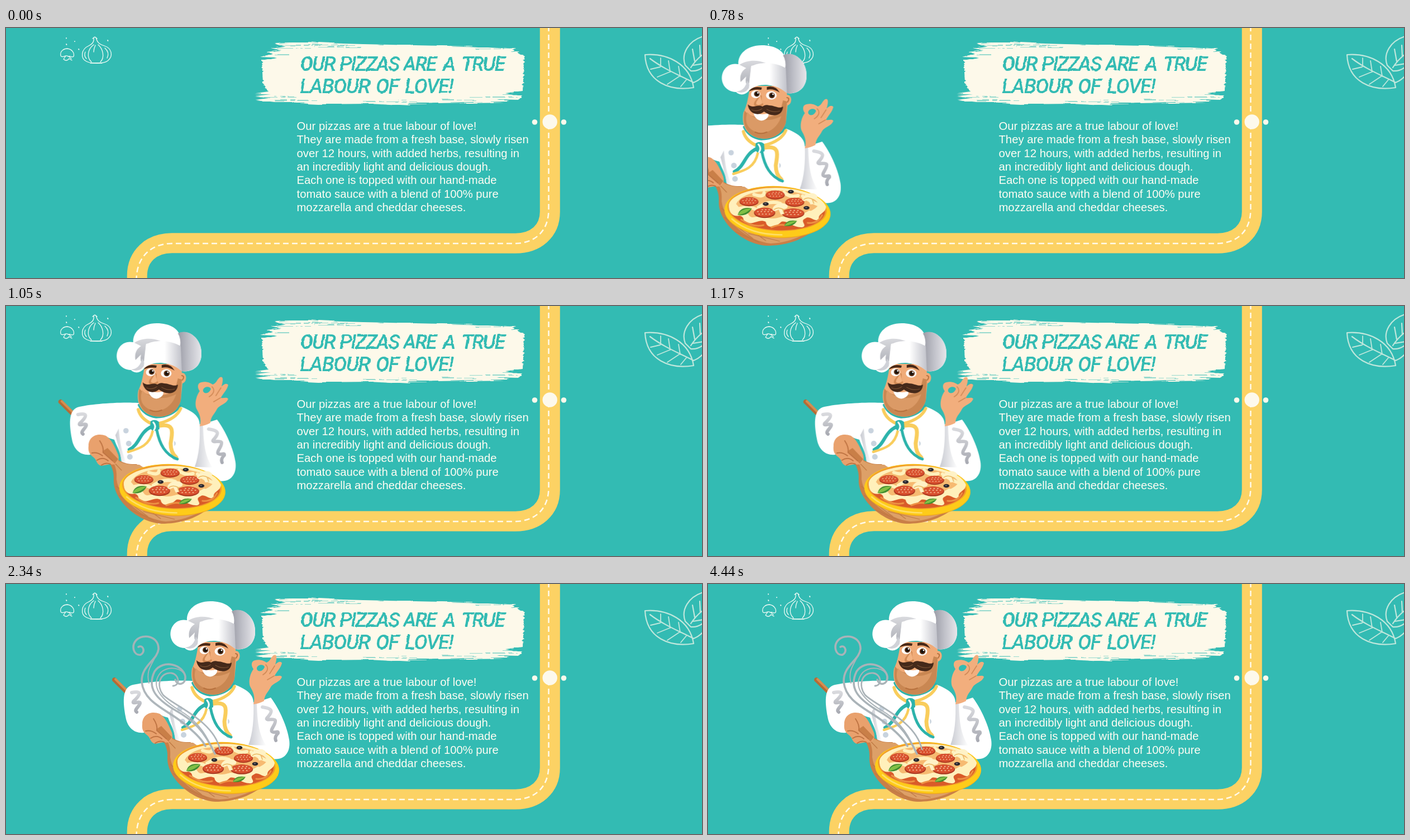
Animation, 1246 px wide and 449 px high, one loop 4.51 s. Source, as an HTML page without scripts:

```html
<!DOCTYPE html>
<html lang="en">
<head>
<meta charset="utf-8">
<title>Pizza chef</title>
<style>
html, body { margin: 0; width: 100%; height: 100%; overflow: hidden; background: #33bbb3; }
svg { display: block; width: 1246px; height: 449px; }
.line { fill: none; stroke-linecap: round; stroke-linejoin: round; }
.copy { font: 20.25px "Liberation Sans", Arial, sans-serif; fill: #fffdf3; }
.title { font: italic 500 36px Roboto, sans-serif; letter-spacing: -2.1px; fill: #33bbb3; }
.chef { animation: slide 4510ms infinite; }
.steam { animation: steam 4510ms infinite; }
@keyframes slide {
  0%, 8.625% { transform: translateX(-520px); animation-timing-function: steps(27); }
  26.585%, 100% { transform: none; }
}
@keyframes steam {
  0%, 26.585% { opacity: 0; animation-timing-function: steps(40); }
  53.19% { opacity: 1; animation-timing-function: steps(40); }
  79.8% { opacity: 0; animation-timing-function: steps(28); }
  98.43%, 100% { opacity: 1; }
}
</style>
</head>
<body>
<svg viewBox="0 0 1246 449">
<defs>
  <filter id="dry" x="-5%" y="-10%" width="110%" height="120%">
    <feTurbulence type="fractalNoise" baseFrequency=".015 .3" numOctaves="2" seed="4"/>
    <feDisplacementMap in="SourceGraphic" scale="7" xChannelSelector="R" yChannelSelector="G"/>
  </filter>
  <filter id="rough" x="-5%" y="-10%" width="110%" height="120%">
    <feTurbulence type="fractalNoise" baseFrequency=".08 .14" numOctaves="2" seed="9"/>
    <feDisplacementMap in="SourceGraphic" scale="3" xChannelSelector="R" yChannelSelector="G"/>
  </filter>
  <linearGradient id="puff">
    <stop offset="0" stop-color="#9b9ca6"/><stop offset=".45" stop-color="#bfc0c8"/><stop offset="1" stop-color="#e6e6ea"/>
  </linearGradient>
  <linearGradient id="band">
    <stop offset="0" stop-color="#fff"/><stop offset=".55" stop-color="#fff"/><stop offset="1" stop-color="#c2c3cb"/>
  </linearGradient>
  <linearGradient id="fold" x1="0" y1="0" x2="0" y2="1">
    <stop offset="0" stop-color="#d9dade"/><stop offset="1" stop-color="#a9abb3"/>
  </linearGradient>
  <linearGradient id="side">
    <stop offset="0" stop-color="#c9cbd2"/><stop offset="1" stop-color="#fff"/>
  </linearGradient>
  <g id="salami">
    <ellipse rx="17" ry="8.3" fill="#a9361f"/>
    <ellipse cy="-.8" rx="16" ry="7.2" fill="#d9512f"/>
    <path class="line" d="M-11-2H12M-9 2H11M-4-5H8" stroke="#f8c9a0" stroke-width="1.7" stroke-dasharray=".5 5"/>
  </g>
  <g id="olive"><ellipse rx="5.3" ry="3.3" fill="#25242c"/><ellipse cx="-.6" cy="-.6" rx="2" ry="1" fill="#77737c"/></g>
  <g id="basil">
    <path d="M-13 6C-11-5 0-9 12-6C8 3 0 8-13 6Z" fill="#3f8c2f"/>
    <path d="M-13 6C-9-3 0-6 12-6C5-1 0 4-13 6Z" fill="#80bf45"/>
  </g>
  <g id="shroom">
    <path d="M-13 2C-12-8 6-14 14-5C16 1 8 1 5 1L8 10L2 11L-2 2C-5 4-11 7-13 2Z" fill="#fff2c6"/>
    <path class="line" d="M-10 2Q-4-3 5 1L8 9" stroke="#eab964" stroke-width="1.6"/>
  </g>
</defs>
<rect width="1246" height="449" fill="#33bbb3"/>

<!-- road -->
<path d="M973.8-20V330C973.8 365 948 386.7 912 386.7L297 386.2C260 386.2 234.7 410 234.7 445V470" fill="none" stroke="#fcd264" stroke-width="36"/>
<path d="M971.5-4V326C971.5 365 947 387 910 387H297C260 387 233.5 411 233.5 452" fill="none" stroke="#fffaea" stroke-width="2.5" stroke-dasharray="10 6"/>
<g fill="#fdf9ec"><circle cx="973.7" cy="168.5" r="13.2"/><circle cx="946.5" cy="169" r="4.8"/><circle cx="998.5" cy="169" r="4.8"/></g>

<!-- banner -->
<g filter="url(#dry)">
  <path d="M458 58L484 53L455 52L478 46L466 43L492 40L474 36L500 33L480 27L540 25L605 28L640 29L830 33L912 38L905 42L921 40L915 45L928 50L925 113L895 117L924 121L918 129L880 128L900 133L830 134L720 136L725 140L650 136L560 137L480 133L447 129L470 126L447 123L474 120L447 117L470 114L460 100Z" fill="#fdf9ea"/>
  <g fill="none" stroke="#33bbb3" stroke-width="1.2">
    <path d="M486 36H545M500 31H610M560 34H640M480 48H506M840 38H905M885 43H912" stroke-dasharray="28 5 12 3"/>
    <path d="M462 125H520M480 130H560M640 132H735M780 129H850M830 124H915M890 119H920" stroke-dasharray="22 6 9 4"/>
  </g>
</g>
<g class="title" filter="url(#rough)">
  <text y="76.5"><tspan x="526">OUR </tspan><tspan x="597">PIZZAS </tspan><tspan x="711">ARE </tspan><tspan x="782">A </tspan><tspan x="815">TRUE</tspan></text>
  <text y="116.5" letter-spacing="-1.4"><tspan x="526">LABOUR </tspan><tspan x="662">OF </tspan><tspan x="714">LOVE!</tspan></text>
</g>
<g class="copy">
  <text x="520.5" y="183">Our pizzas are a true labour of love!</text>
  <text x="520.5" y="207.3">They are made from a fresh base, slowly risen</text>
  <text x="520.5" y="231.6">over 12 hours, with added herbs, resulting in</text>
  <text x="520.5" y="255.9">an incredibly light and delicious dough.</text>
  <text x="520.5" y="280.2">Each one is topped with our hand-made</text>
  <text x="520.5" y="304.5">tomato sauce with a blend of 100% pure</text>
  <text x="520.5" y="328.8">mozzarella and cheddar cheeses.</text>
</g>

<!-- garlic and mushroom -->
<g class="line" stroke="#effaf5" stroke-width="1.3">
  <path d="M157 17C158 26 154 29 148 32C134 38 133 55 144 60C152 64 174 65 182 59C193 50 189 36 176 32C166 29 163 25 161 17M155 19L159 16L163 19"/>
  <path d="M157 30C146 38 144 53 153 61M165 30C174 38 177 53 169 61M160 31Q157 37 157 43M177 36Q186 44 181 54M142 43Q139 50 144 55M151 63L172 63"/>
  <path d="M98 50C96 41 104 37 110 37C118 38 123 45 121 51C118 54 115 49 111 51C107 47 101 55 98 50ZM107 50L103 56Q108 61 113 55L118 58M112 51L117 55"/>
  <path d="M108 29L108.5 30M108 18V18.5M130 38L130.5 38.5M182 22L182.5 23M123 24V24.2" stroke-width="1.8"/>
</g>

<!-- leaves -->
<g class="line" stroke="#bfe7dc" stroke-width="2.2">
  <path d="M1144 48C1184 45 1224 64 1231 107C1188 114 1146 97 1144 48ZM1153 55C1178 74 1206 85 1231 98Q1241 94 1248 86"/>
  <path d="M1172 69V54M1189 79L1186 59M1207 87L1204 69M1171 70L1154 74M1188 79L1166 88M1205 87L1184 101M1218 93L1208 105" stroke-width="1.8"/>
  <path d="M1248 15C1222 23 1208 46 1216 67L1226 77M1226 71Q1235 57 1248 47M1233 60L1229 38M1243 51L1242 31M1230 67L1248 64M1226 77Q1239 78 1248 70"/>
</g>

<g class="chef">
  <!-- handle end -->
  <path class="line" d="M194 172L222 200" stroke="#b56b35" stroke-width="8"/>
  <path class="line" d="M196 171L222 197" stroke="#d68d50" stroke-width="4"/>

  <!-- jacket -->
  <path d="M332 174C300 172 245 176 224 182C207 189 210 215 214 238C217 258 230 269 247 267L262 232L290 240L304 275L310 305H430L476 314C500 318 510 300 507 280C504 258 490 225 474 204L443 214C443 197 430 189 408 180Z" fill="#fff"/>
  <path d="M298 220C300 240 302 260 312 282H303C300 262 296 246 292 232Z" fill="url(#side)"/>
  <path d="M434 289C442 268 444 242 443 212L449 215C450 245 452 270 466 290Z" fill="url(#side)"/>
  <path d="M268 234C288 234 301 254 303 282L294 270C290 250 281 240 268 234Z" fill="#33bbb3"/>
  <g class="line" stroke="url(#fold)" stroke-width="6">
    <path d="M225 195C244 191 241 199 228 211C225 217 240 209 240 214C239 220 228 226 234 230"/>
    <path d="M459 221C480 224 477 230 467 241C464 246 480 241 482 245C484 251 473 261 476 265C480 269 488 262 487 268Q480 275 483 281"/>
  </g>
  <g fill="#c8d3de"><circle cx="311" cy="224" r="4.8"/><circle cx="316" cy="247" r="5"/><circle cx="318" cy="271" r="5"/><circle cx="389" cy="222" r="5"/><circle cx="395" cy="247" r="5"/><circle cx="399" cy="272" r="5"/></g>

  <!-- scarf -->
  <path d="M335 174L331 191L356 214L370 214L408 193V180L365 202Z" fill="#fff"/>
  <path d="M357 218C341 228 338 249 314 262C336 260 352 250 359 222ZM366 218C376 250 382 270 403 275C392 258 404 222 386 215Z" fill="#fff"/>
  <g class="line" stroke-width="5.5">
    <path d="M335 178Q344 196 365 199Q393 198 407 180" stroke="#2cb3ab"/>
    <path d="M333 186Q337 202 356 211M409 184Q401 203 370 211" stroke="#f9cd5c"/>
    <path d="M356 217C334 228 336 248 317 258" stroke="#2cb3ab" stroke-width="6"/>
    <path d="M359 224C354 250 336 256 315 262" stroke="#f9cd5c" stroke-width="4.5"/>
    <path d="M371 215C401 210 393 230 391 247Q391 263 401 272" stroke="#f9cd5c" stroke-width="7"/>
    <path d="M366 222C371 248 381 267 403 275" stroke="#2cb3ab" stroke-width="5"/>
  </g>
  <path d="M355 207Q363 202 370 208L371 221Q362 228 354 220Z" fill="#2cb3ab"/>
  <path class="line" d="M360 209Q366 216 361 223" stroke="#fff" stroke-width="3"/>

  <!-- raised hand -->
  <path fill-rule="evenodd" d="M443 216C447 202 442 193 437 184C433 172 439 158 443 153C438 146 439 138 446 137C455 135 462 138 466 141C472 140 474 132 479 128C486 125 485 134 482 145C486 140 492 138 494 142C492 151 484 158 481 165C486 166 492 163 494 167C491 176 478 178 474 185C469 195 463 198 462 210Q453 215 443 216ZM449 153C452 159 460 157 463 149C462 143 448 144 449 153Z" fill="#f2ae7d"/>
  <path class="line" d="M465 145C471 151 468 158 460 163M481 147L472 161M480 165L468 172" stroke="#d28b58" stroke-width="1.7"/>

  <!-- head -->
  <path d="M345 104C342 122 340 138 333 152C329 174 338 191 358 197C381 203 402 193 409 170L412 139C421 137 421 120 411 120V104Z" fill="#f0ab78"/>
  <path d="M335 148C330 171 337 190 358 197C381 203 402 193 409 170L411 132L404 130L399 150C390 162 348 167 335 148Z" fill="#c98752"/>
  <path d="M340 151C334 170 341 181 356 187C375 192 394 181 401 158C384 169 354 168 340 151Z" fill="#db9a66"/>
  <path class="line" d="M354 187Q364 192 375 187M411 125Q417 126 412 133" stroke="#b8723f" stroke-width="2"/>
  <path d="M362 119C359 128 351 131 352 138C356 144 367 142 369 137Q365 134 366 122Z" fill="#d28b56"/>
  <path d="M363 120C361 129 355 131 356 137Q362 140 367 135Z" fill="#f3b382"/>
  <ellipse cx="355" cy="119" rx="8.3" ry="7" fill="#fff"/><ellipse cx="383" cy="121" rx="9.5" ry="7.5" fill="#fff"/>
  <circle cx="357" cy="118.5" r="5" fill="#5a3218"/><circle cx="384" cy="121" r="5.3" fill="#5a3218"/>
  <circle cx="357" cy="118.5" r="2.9" fill="#15100d"/><circle cx="384" cy="121" r="3" fill="#15100d"/>
  <circle cx="359" cy="116.5" r="1.4" fill="#fff"/><circle cx="386" cy="119" r="1.4" fill="#fff"/>
  <path d="M343 114Q349 103 366 107L365 111Q352 109 343 114ZM375 106Q390 102 398 116Q386 108 375 111Z" fill="#472716"/>
  <path d="M351 151C352 162 361 168 368 166C376 164 379 158 378 153Q364 158 351 151Z" fill="#fff"/>
  <path d="M341 137C342 153 359 160 370 150C383 160 403 160 404 141C397 146 389 139 379 139C373 137 369 140 367 141C358 136 350 146 341 137Z" fill="#45291a"/>
  <path class="line" d="M348 147Q358 151 366 145M375 146Q387 153 398 149" stroke="#795033" stroke-width="1.3"/>

  <!-- hat -->
  <path d="M344 111C336 123 324 120 320 115C300 115 289 95 297 78C303 66 314 63 324 65C323 48 338 31 366 31C390 31 402 41 406 49C424 41 446 59 446 84C447 106 432 120 411 117C391 98 360 98 344 111Z" fill="#fff"/>
  <path d="M404 49C424 39 446 60 446 84C447 106 431 120 410 117L408 73Q410 59 404 49Z" fill="url(#puff)"/>
  <path d="M326 66C340 57 358 57 373 63L347 68L342 109Q335 98 338 87L328 97Q325 80 338 72Z" fill="url(#fold)"/>
  <path d="M320 114Q336 113 340 94L345 104Q337 121 320 114Z" fill="#d0d2d8"/>
  <path d="M347 69C362 60 390 61 409 72L411 117C391 99 362 98 343 108Z" fill="url(#band)"/>

  <!-- board -->
  <path d="M266 259C276 274 291 289 289 312C288 350 334 389 375 391C405 391 436 383 459 363L330 284C306 285 293 277 279 256Z" fill="#c97f48"/>
  <path d="M274 258C286 278 296 286 294 311C299 348 342 383 382 387Q420 385 452 365L335 285C306 286 290 279 279 257Z" fill="#dda068"/>
  <path class="line" d="M286 277L303 295M299 340L350 378M294 324L373 382M319 366L361 385M342 369L398 383" stroke="#be7943" stroke-width="1.2"/>

  <!-- pizza -->
  <g transform="rotate(3 394 330)">
    <ellipse cx="394" cy="330.5" rx="95" ry="46.5" fill="#f0a81b"/>
    <ellipse cx="394" cy="330" rx="95" ry="45.5" fill="#fecb19"/>
    <ellipse cx="393" cy="325" rx="89" ry="39.5" fill="#f09a2c"/>
    <ellipse cx="393" cy="325.5" rx="86" ry="37.5" fill="#d95b29"/>
    <path class="line" d="M313 347Q347 374 404 371" stroke="#ffdf67" stroke-width="2.5"/>
  </g>
  <path d="M307 317C311 299 352 286 394 287C438 288 474 302 481 321C480 333 468 332 468 342C464 352 451 335 444 342C432 347 450 355 438 358C421 359 413 345 401 348C389 360 375 360 373 348C362 342 352 353 340 350C329 348 338 340 326 337C315 340 306 332 307 317Z" fill="#fff0bb"/>
  <path d="M320 316C332 294 368 292 396 292C428 292 461 302 468 317C458 332 440 329 438 339C422 345 409 336 394 341C377 345 368 336 350 340C340 340 344 328 331 329Z" fill="#f6ba71"/>
  <path class="line" d="M352 299Q370 305 370 296M360 322Q380 309 399 315M439 302Q457 314 469 318M327 324Q348 320 357 327M402 342Q427 347 451 331M406 295Q415 305 431 301" stroke="#fff0bb" stroke-width="6"/>
  <path class="line" d="M329 344Q351 359 369 354M383 358Q398 352 407 354M448 350Q466 352 474 336" stroke="#ed9143" stroke-width="3"/>
  <use href="#salami" x="343" y="312"/><use href="#salami" x="390" y="300"/><use href="#salami" x="425" y="313"/>
  <use href="#salami" transform="translate(371 332) scale(1.12)"/><use href="#salami" transform="translate(422 333) scale(1.18 1.05)"/>
  <use href="#shroom" x="398" y="324"/><use href="#shroom" x="451" y="306"/>
  <use href="#olive" x="373" y="316"/><use href="#olive" x="446" y="323"/><use href="#olive" x="418" y="294"/>
  <use href="#basil" x="336" y="330"/><use href="#basil" transform="translate(418 351) scale(.9 .75)"/>

  <!-- gripping hand -->
  <path d="M244 251C244 234 260 227 275 233C286 240 291 253 297 267C301 280 292 287 283 284L267 287C257 284 260 277 252 271C245 266 243 260 244 251Z" fill="#e9a16d"/>
  <path d="M278 255L297 275L291 283L269 261Z" fill="#c97f48"/>
  <path class="line" d="M264 242Q272 254 270 263L287 278M250 264Q260 262 269 269M259 277Q270 270 279 278M267 286Q275 280 283 284" stroke="#bf7443" stroke-width="2"/>
</g>

<g class="steam line" stroke="#aab3b8" stroke-width="3.6">
  <path d="M237 113C246 108 250 123 241 127C228 129 224 111 233 101C246 88 274 94 273 117C271 137 242 146 243 176C247 216 293 226 326 257Q349 276 357 291"/>
  <path d="M273 117C265 143 249 151 256 178" stroke-width="2"/>
  <path d="M303 172C307 184 322 181 321 166C317 145 282 134 266 157C251 188 271 207 300 225C338 246 355 264 374 305"/>
  <path d="M299 183C313 182 310 162 296 160C276 158 268 181 281 199C300 219 371 244 383 297" stroke-width="2.8"/>
  <path d="M321 166C316 150 291 146 277 159C259 180 272 203 309 226Q351 250 367 292" stroke-width="2"/>
</g>
</svg>
</body>
</html>
```
